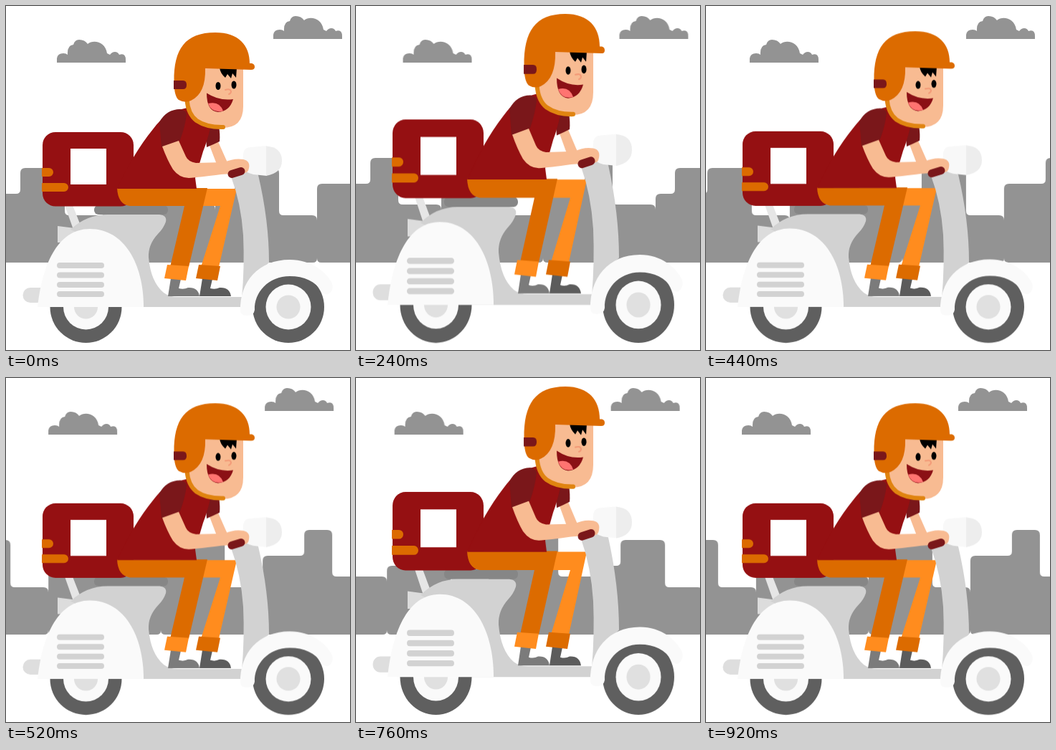
Recreate the animation shown at these times as an HTML page without scripts. Size 480 by 480 pixels, loop 0.96 s.

```html
<!DOCTYPE html>
<html lang="en">
<head>
<meta charset="utf-8">
<title>Scooter delivery</title>
<style>
  html, body { margin: 0; width: 100%; height: 100%; overflow: hidden; background: #fff; }
  svg { display: block; width: 100vw; height: 100vh; }

  .smoke { fill: #939393; }
  .red { fill: #951012; }
  .maroon { fill: #7a171a; }
  .orange { fill: #dc6b00; }
  .bright { fill: #ff8c1e; }
  .skin { fill: #f8bb92; }
  .metal { fill: #d2d2d2; }
  .white { fill: #fafafa; }
  .tyre { fill: #5f5f5f; }
  .hub { fill: #e0e0e0; }
  .line { fill: none; stroke-linecap: round; }

  /* Everything advances on a 40 ms beat. */
  .clouds { animation: drift 960ms steps(24, end) infinite; }
  .city { animation: pass 960ms steps(24, end) infinite; }
  .ride { transform-origin: 0 470px; animation: bounce 480ms step-end infinite; }

  @keyframes drift { to { transform: translateX(-21.9px); } }
  @keyframes pass { to { transform: translateX(-692px); } }
  @keyframes bounce {
    0%, 100% { transform: scaleY(1); }
    8.333%, 91.666% { transform: scaleY(1.004); }
    16.666%, 83.333% { transform: scaleY(1.019); }
    25%, 75% { transform: scaleY(1.0385); }
    33.333%, 66.666% { transform: scaleY(1.052); }
    41.666%, 58.333% { transform: scaleY(1.058); }
    50% { transform: scaleY(1.06); }
  }
</style>
</head>
<body>
<svg viewBox="0 0 480 480" xmlns="http://www.w3.org/2000/svg">
  <defs>
    <path id="cloud" d="M71 79V73Q72 66 80 66Q84 66 86 68Q85 55 94 54Q96 47 102 47Q110 47 114 53C122 46 139 50 141 66L145 68Q148 64 152 64Q156 64 158 68Q167 65 167 75V79Z"/>
    <g id="block">
      <path d="M0 255q0-7 7-7H52q6 0 6-6V219q0-7 7-7H90q7 0 7 7V271q0 6 6 6H150q7 0 7 7V352q0 6-6 6H6q-6 0-6-6Z"/>
      <path d="M157 269q0-7 7-7H178q6 0 6-6V233q0-7 7-7H239q7 0 7 7V286q0 6 6 6H292q7 0 7 7V352q0 6-6 6H163q-6 0-6-6Z"/>
    </g>
    <g id="wheel">
      <circle class="tyre" r="50"/>
      <circle class="white" r="31.500"/>
      <circle class="hub" r="16.500"/>
    </g>
    <path id="shoe" d="M230 380L244 381L241 394Q248 396 254 393Q268 392 270 405H226Z"/>
    <path id="cuff" d="M225 361L255 363L251 383L221 380Z"/>
  </defs>

  <g class="clouds smoke">
    <use href="#cloud"/>
    <use href="#cloud" x="302" y="-33"/>
  </g>

  <g class="city smoke">
    <use href="#block" x="-164"/>
    <use href="#block" x="135"/>
    <use href="#block" x="434"/>
    <use href="#block" x="733"/>
    <use href="#block" x="1032"/>
  </g>

  <g class="ride">
    <!-- scooter rear -->
    <path fill="#dcdcdc" d="M72 307L96 310V330H72Z"/>
    <path fill="#e6e6e6" d="M82 278H93L104 306L94 312Z"/>
    <rect x="123" y="278" width="103" height="13" rx="6" fill="#868686"/>
    <path class="metal" d="M90 312Q112 291 142 291H214Q225 292 223 301Q220 310 212 318Q198 333 199 351Q202 385 220 400Q228 406 240 406H331L327 420H150V340Z"/>
    <path fill="#dedede" d="M50 393H34a10.500 10.500 0 0 0 0 21H50Z"/>
    <use href="#wheel" x="111.500" y="420"/>
    <path class="white" d="M44 420C50 365 70 311 117 311C165 311 192 360 192 420Z"/>
    <path class="line" stroke="#d2d2d2" stroke-width="8" d="M75 362H133M75 375.500H133M75 389H133M75 402H133"/>

    <!-- delivery box -->
    <rect class="red" x="51" y="176" width="127" height="103.500" rx="18"/>
    <path class="orange" d="M50 226H60a6 6 0 0 1 0 12H50ZM50 247H81a6 6 0 0 1 0 12H50Z"/>
    <rect x="90" y="199" width="50" height="50" fill="#fff"/>

    <!-- legs -->
    <use href="#shoe" fill="#7b7b7b"/>
    <use href="#shoe" x="44" fill="#5c5c5c"/>
    <path class="bright" d="M280 255H322L297 364H272L299 279H274Z"/>
    <path class="orange" d="M155 254H281L255 364H229L249 279H173Q156 277 155 254Z"/>
    <use href="#cuff" class="bright"/>
    <use href="#cuff" class="orange" x="44"/>

    <!-- scooter front -->
    <path class="metal" d="M314 238Q328 275 331 320Q333 365 329 408L345 380L367 358Q367 300 352 236L345 228Q328 222 314 238Z"/>
    <use href="#wheel" x="394" y="420"/>
    <path class="white" d="M327 425C326 385 352 354 396 354C426 354 447 371 455 387Q458 397 450 402Q446 404 441 399C432 384 416 377 396 377C366 377 346 400 347 424Q346 432 336 432Q327 432 327 425Z"/>
    <path fill="#f8f8f8" d="M342 197Q331 197 331 208L330 224Q332 232 345 235L364 237V195Z"/>
    <path fill="#ededed" d="M363 195.500Q385 197 385 216Q385 233 363 237Z"/>

    <!-- torso and arms -->
    <path class="skin" d="M283 192L295 187L307 214L313 226H296Z"/>
    <path class="maroon" d="M278 171L297 167Q299 180 298 189Q290 193 280 197Z"/>
    <path class="red" d="M155 255Q178 205 205 172Q225 145 245 144L253 142L285 170Q281 188 275 203L264 240L266 255Z"/>
    <path class="maroon" d="M214 162Q224 144 243 144Q252 146 252 151Q250 168 243 187Q234 193 217 197Z"/>
    <path class="skin" d="M218 196L241 188L251 210Q254 217 265 219L305 218Q318 212 331 214Q341 216 339 226Q338 234 330 233L300 235Q270 239 255 240Q242 240 233 228Q225 215 218 196Z"/>
    <path class="line" stroke="#7a171a" stroke-width="11" d="M315 234.500L328 230.500"/>

    <!-- head -->
    <path class="skin" d="M250 84H331V140Q331 170 302 170Q258 169 252 130Z"/>
    <path class="line" stroke="#e08410" stroke-width="6" d="M252.500 131Q254 151 266 160Q280 169.500 303 169"/>
    <path d="M298 86H322L321 100L316 94L314 101L309 95L306 100Q299 94 298 86Z"/>
    <path class="orange" d="M234.500 105C234 60 250 37 292 37C325 37 340 55 340 80H343Q347 81 347 85Q347 89 342 89L278 87Q279 122 258 132Q250 136 241 131Q234.500 126 234.500 105Z"/>
    <path class="maroon" d="M234 104H247q5 0 5 6t-5 6H234Z"/>
    <ellipse cx="296" cy="111.500" rx="3.500" ry="5.500"/>
    <ellipse cx="318" cy="110" rx="3.500" ry="5.500"/>
    <path class="line" stroke="#f39b78" stroke-width="2" d="M306 117Q313 115 314 119Q314 122 311 123"/>
    <path fill="#8b1015" d="M280 121.500Q298 133 317 130Q312 147 296 148Q280 147 280 121.500Z"/>
    <path fill="#ff7471" d="M282 136Q298 132 303 146.500Q287 150 282 136Z"/>
  </g>
</svg>
</body>
</html>
```
